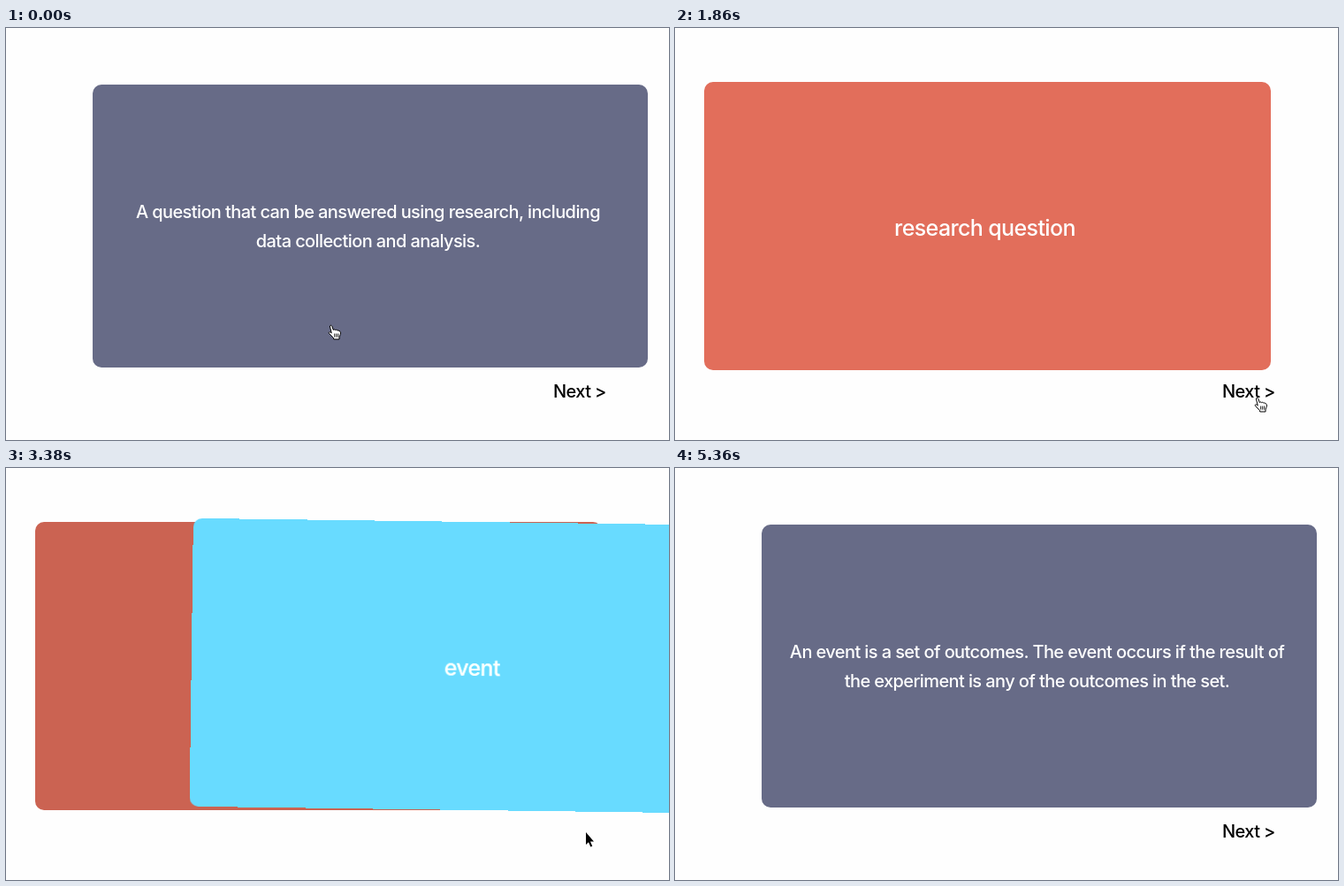
Write an HTML page that moves like this. It is 750 px wide and 466 px high and loops after 5960 ms.

```html
<!DOCTYPE html>
<html lang="en">
<head>
<meta charset="utf-8">
<title>Flash cards</title>
<style>
html, body {
  margin: 0;
  width: 100%;
  height: 100%;
  overflow: hidden;
  background: #fefefe;
}
#stage {
  position: absolute;
  left: 0;
  top: 0;
  width: 750px;
  height: 466px;
  overflow: hidden;
  background: #fefefe;
  font: 500 20px/33px Inter, "Open Sans", sans-serif;
  letter-spacing: -0.03em;
  white-space: nowrap;
  perspective: 1000px;
  perspective-origin: 353px 224px;
}
.card {
  position: absolute;
  box-sizing: border-box;
  display: flex;
  align-items: center;
  justify-content: center;
  border-radius: 10px;
  color: #fff;
  text-align: center;
}
.front {
  left: 33px;
  top: 61px;
  width: 641px;
  height: 326px;
  padding: 4px 6px 0 0;
  font-size: 25px;
  letter-spacing: -0.025em;
}
.back {
  left: 98px;
  top: 64px;
  width: 628px;
  height: 320px;
  padding: 1px 5px 0 0;
  background: #676b87;
}
.red { background: #e26e5b; }
.blue { background: #5bc0ec; }
#next {
  position: absolute;
  left: 619px;
  top: 395px;
  color: #000;
}
#cursor {
  position: absolute;
  left: 0;
  top: 0;
  overflow: visible;
}
</style>
</head>
<body>
<div id="stage">
  <div id="next">Next &gt;</div>
  <div class="card front red" id="front1">research question</div>
  <div class="card back" id="back1">A question that can be answered using research, including<br>data collection and analysis.</div>
  <div class="card front blue" id="front2">event</div>
  <div class="card back" id="back2">An event is a set of outcomes. The event occurs if the result of<br>the experiment is any of the outcomes in the set.</div>
  <svg id="cursor" width="16" height="20">
    <g id="hand" stroke="#000" stroke-linejoin="round" stroke-linecap="round">
      <path fill="#fff" d="M4 9 2.500 3C2 1 4 .7 4.700 2.200L6.300 6.600C6.700 5.600 8.200 5.700 8.500 6.800 9 6 10.400 6.200 10.700 7.200 11.500 6.600 12.600 7 13 8 14 7.800 14.500 8.800 14.500 10 14.300 12.500 13 13.500 13 15V17H6.700L6.400 15.500C5 14 3 12 1.300 10.300 .7 9 2.300 8 4 9.800Z"/>
      <path fill="none" stroke-width=".9" d="M7.700 11v3.300m2-3.300v3.300m2-3.300v3.300"/>
    </g>
    <path id="arrow" transform="translate(4 -2)" stroke="#fff" stroke-width="1.200" paint-order="stroke"
      d="M1 0V14L4 11.300 6.300 16.600 8.300 15.700 6 10.600H10Z"/>
  </svg>
</div>
<script>
// The picture advances in even ticks; the last one is held until the loop ends.
const LOOP = 5960, TICK = 116.6, LEAD = 13, LAST = 46;

// Moments, in ticks
const FLIP_OPEN = 12.46, FLIP_CLOSE = 40.46;
const CLICK_NEXT = 21, SLIDE_FROM = 26, SLIDE_TO = 32;

const HOME = { x: 364, y: 335 };
const MOVES = [
  { from: 0, to: 7, x: 610, y: 382 },
  { from: 7, to: 9, x: 568, y: 350 },
  { from: 12, to: 16, x: 655, y: 417 },
  { from: 16, to: 19, x: 651, y: 414 },
  { from: 32, to: 36, x: 618, y: 376 },
  { from: 40, to: 45, x: 684, y: 449 }
];

const $ = id => document.getElementById(id);
const [front1, back1, front2, back2, next, cursor, hand, arrow] =
  ["front1", "back1", "front2", "back2", "next", "cursor", "hand", "arrow"].map($);

const ramp = (t, from, to) => Math.min(1, Math.max(0, (t - from) / (to - from)));
const smooth = u => u * u * (3 - 2 * u);
const show = (el, on) => { el.style.visibility = on ? "visible" : "hidden"; };

// Exponential ease in and out around a middle tick
function turn(tick, middle) {
  const v = 2.55 * (tick - middle);
  if (Math.abs(v) > 6) return v < 0 ? 0 : 1;
  return v < 0 ? 2 ** v / 2 : 1 - 2 ** -v / 2;
}

// Both faces turn about one axis; the front is a little larger than the back.
function flip(front, back, angle) {
  const grow = 0.0207, k = Math.sqrt(Math.sin(angle * Math.PI / 360));
  front.style.transformOrigin = "350px 163px";
  back.style.transformOrigin = "285px 160px";
  front.style.transform = `scale(${1 - grow * (1 - k)}) rotateY(${180 - angle}deg)`;
  back.style.transform = `scale(${1 + grow * k}) rotateY(${-angle}deg)`;
  show(front, angle > 90);
  show(back, angle <= 90);
}

function slide(card, u) {
  const left = (1 - u) ** 2;
  card.style.transformOrigin = "50% 50%";
  card.style.transform = `translateX(${707 * left}px) rotate(${3 * left}deg)`;
}

function drawCards(tick) {
  const angle = 180 * (turn(tick, FLIP_OPEN) - turn(tick, FLIP_CLOSE));
  if (tick < SLIDE_TO) {
    flip(front1, back1, angle);
    slide(front2, ramp(tick, SLIDE_FROM, SLIDE_TO));
    show(front2, tick >= SLIDE_FROM);
    show(back2, false);
  } else {
    show(front1, false);
    show(back1, false);
    flip(front2, back2, angle);
  }
  front1.style.filter = tick < CLICK_NEXT ? "none" : "brightness(.9)";
  front2.style.filter = `brightness(${1.14 - 0.14 * ramp(tick, 30, 36)})`;
}

function drawPointer(tick) {
  let { x, y } = HOME;
  for (const move of MOVES) {
    const u = smooth(ramp(tick, move.from, move.to));
    x += (move.x - x) * u;
    y += (move.y - y) * u;
  }
  const isArrow = (tick >= CLICK_NEXT && tick < 31) || tick >= 43;
  cursor.style.transform = `translate(${Math.round(x)}px, ${Math.round(y)}px)`;
  show(arrow, isArrow && tick < LAST);
  show(hand, !isArrow);
}

function draw(tick) {
  drawCards(tick);
  drawPointer(tick);
  next.style.opacity = tick < CLICK_NEXT || tick >= 42 ? 1 : tick < 31 ? 0 : 0.32;
}

const start = performance.now();
let shown = -1;

function run() {
  const time = (performance.now() - start) % LOOP;
  const tick = Math.min(LAST, Math.floor((time + LEAD) / TICK));
  if (tick !== shown) draw(shown = tick);
  requestAnimationFrame(run);
}
run();
</script>
</body>
</html>
```
